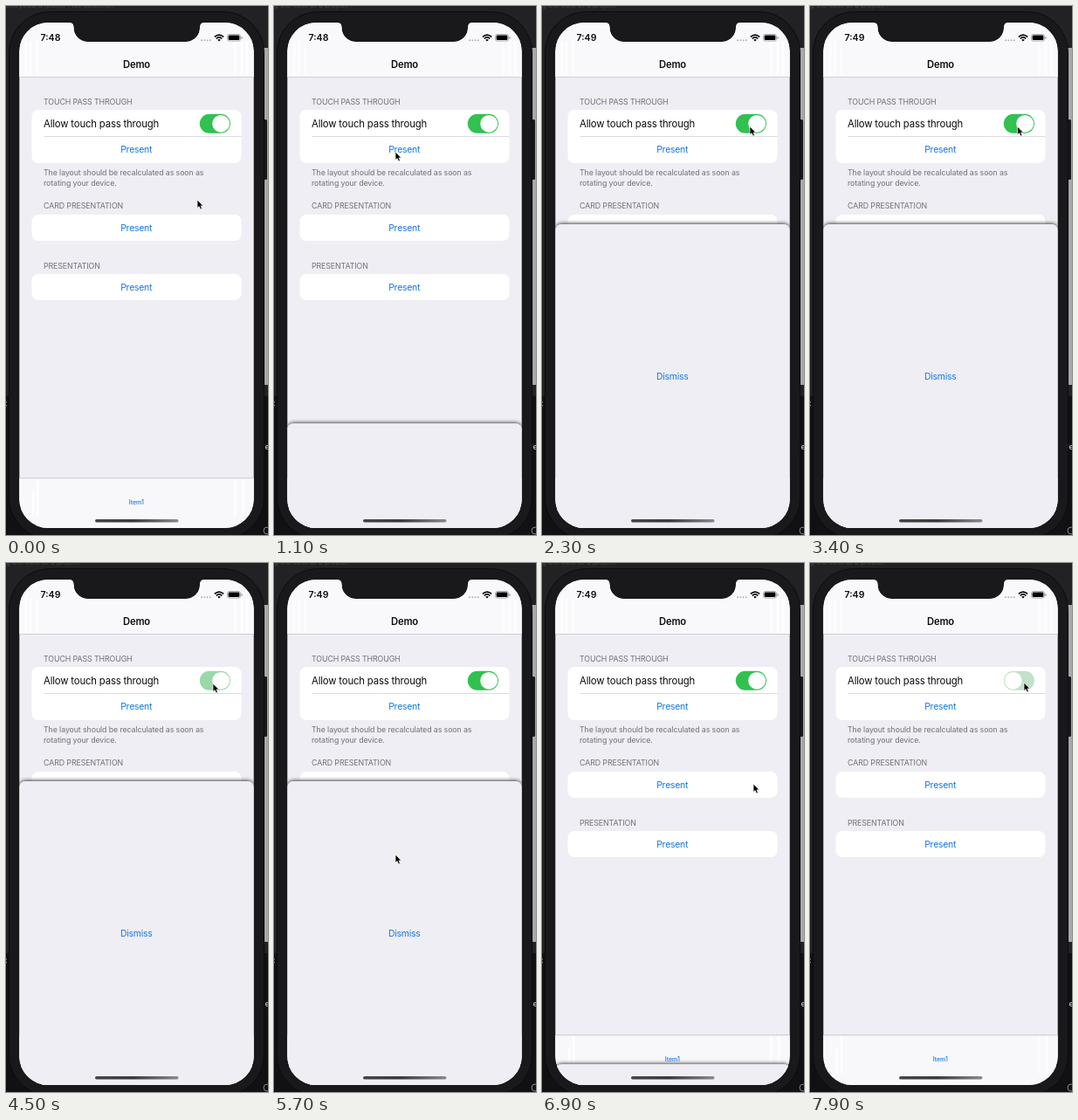
An HTML page for the animation above (8 s loop, 300 by 606 pixels).

```html
<!DOCTYPE html>
<html lang="en">
<head>
<meta charset="utf-8">
<title>Sheet demo</title>
<style>
  html, body { margin: 0; width: 100%; height: 100%; overflow: hidden; background: #0b0a0c; }
  svg { display: block; width: 300px; height: 606px; }
  text { font-family: Inter, Roboto, sans-serif; fill: #0c0c0d; }
  .mid { text-anchor: middle; }
  .row { font-size: 11.3px; letter-spacing: -.15px; }
  .note { font-size: 8.8px; letter-spacing: -.09px; fill: #707075; }
  .link { font-size: 10.4px; letter-spacing: -.22px; fill: #1476e8; text-anchor: middle; }
  .title { font-size: 11.2px; font-weight: 600; letter-spacing: -.2px; }
  .clock { font-size: 10.6px; font-weight: 600; }
  .tab { font-size: 7px; font-weight: 500; fill: #1476e8; }
  .dim { font-size: 8px; fill: #434246; }
</style>
</head>
<body>
<svg viewBox="0 0 300 606">
  <defs>
    <clipPath id="screen">
      <path d="M15.3 52A33 33 0 0 1 48.3 19H72.5Q77.5 19 77.5 25A16 16 0 0 0 93.5 41H206A16 16 0 0 0 222 25Q222 19 227 19H250.7A33 33 0 0 1 283.7 52V565A33 33 0 0 1 250.7 598H48.3A33 33 0 0 1 15.3 565Z"/>
    </clipPath>
    <filter id="shade" x="-10%" y="-10%" width="120%" height="120%">
      <feDropShadow dx="0" dy="-.8" stdDeviation="2" flood-color="#000" flood-opacity=".8"/>
    </filter>
    <linearGradient id="bar">
      <stop offset="0" stop-color="#454448"/>
      <stop offset=".45" stop-color="#3a393d"/>
      <stop offset="1" stop-color="#8a898d"/>
    </linearGradient>
  </defs>

  <!-- desktop behind the phone -->
  <rect width="300" height="606" fill="#111012"/>
  <rect width="300" height="447" fill="#222124"/>
  <text id="crumb" class="dim" y="2"></text>
  <rect x="290" y="48" width="20" height="386" rx="5" fill="#a9a8ac"/>
  <text x="-1" y="458" font-size="9" style="fill:#ccc">:</text>
  <text x="294" y="508" font-size="9" style="fill:#ddd">.e</text>
  <circle cx="299" cy="601" r="4" fill="none" stroke="#88878a"/>

  <!-- phone -->
  <rect x="294" y="130" width="5" height="69" rx="1.5" fill="#19181b"/>
  <rect x="3.5" y="6.5" width="292" height="604" rx="47" fill="#19181b" stroke="#0c0b0d"/>
  <g clip-path="url(#screen)">
    <rect x="15" y="19" width="269" height="579" fill="#efeef4"/>
    <rect x="15" y="19" width="269" height="62" fill="#f9f9fc"/>
    <path d="M15 81.5H284" stroke="#c9c8cd" stroke-width=".8"/>
    <path d="M23 41V80M28 41V80M36 41V80M262 41V80M270 41V80M276 41V80" stroke="#fff" stroke-width="3" opacity=".7"/>

    <text id="clock" class="clock" x="39.5" y="40.3"></text>
    <g fill="#b4b4b8">
      <circle cx="224" cy="39.2" r="1"/><circle cx="227.3" cy="39.2" r="1"/>
      <circle cx="230.6" cy="39.2" r="1"/><circle cx="233.9" cy="39.2" r="1"/>
    </g>
    <path d="M238.8 35.4Q244 30.8 249.2 35.4M240.7 37.4Q244 34.5 247.3 37.4" fill="none" stroke="#000" stroke-width="1.6"/>
    <path d="M242.2 38.7Q244 37.3 245.8 38.7L244 40.6Z"/>
    <rect x="253.5" y="32.5" width="15" height="7.6" rx="2.2" fill="none" stroke="#8c8c8f" stroke-width=".7"/>
    <rect x="254.6" y="33.6" width="12.8" height="5.4" rx="1.3"/>
    <path d="M269.5 35V37.8Q270.8 37.5 270.8 36.4T269.5 35Z" fill="#8c8c8f"/>
    <text class="title mid" x="149.5" y="71">Demo</text>

    <g fill="#fff">
      <rect x="29.5" y="119" width="240" height="61" rx="7.5"/>
      <rect x="29.5" y="239" width="240" height="30" rx="7.5"/>
      <rect x="29.5" y="307" width="240" height="30" rx="7.5"/>
    </g>
    <path d="M43.5 149.5H269.5" stroke="#d3d2d7" stroke-width=".8"/>
    <text class="note" x="43" y="112.7">TOUCH PASS THROUGH</text>
    <text class="row" x="43" y="138.9">Allow touch pass through</text>
    <text id="present" class="link" x="149.2" y="168.4">Present</text>
    <text class="note" x="43" y="193.6">The layout should be recalculated as soon as</text>
    <text class="note" x="43" y="206">rotating your device.</text>
    <text class="note" x="43" y="232.4">CARD PRESENTATION</text>
    <text class="link" x="149.2" y="258">Present</text>
    <text class="note" x="43" y="300.7">PRESENTATION</text>
    <text class="link" x="149.2" y="326.2">Present</text>

    <rect id="track" x="221.8" y="123.8" width="35.2" height="22" rx="11"/>
    <circle id="thumb" cy="134.8" r="9.9" fill="#fff"/>

    <rect x="15" y="541" width="269" height="58" fill="#f8f8fb"/>
    <path d="M15 540.8H284" stroke="#c4c3c8" stroke-width=".8"/>
    <path d="M36 542V585M31 555V585M262 542V585M271 542V585" stroke="#fff" stroke-width="3" opacity=".7"/>
    <text class="tab mid" x="149.3" y="571">Item1</text>

    <g id="sheet">
      <rect x="15.3" width="268.4" height="380" rx="7" fill="#efeef4" filter="url(#shade)"/>
      <text id="dismiss" class="link" x="149.2" y="177.8">Dismiss</text>
    </g>
    <rect x="102" y="588" width="95.5" height="3.6" rx="1.8" fill="url(#bar)"/>
  </g>

  <path id="cursor" d="M0 0V9.4L2.1 7.6L3.7 11L5.4 10.2L4 6.9H6.8Z" fill="#000" stroke="#fff" stroke-width=".7" stroke-linejoin="round"/>
</svg>

<script>
const LOOP = 8000, STEP = 100;
const OPEN_Y = 250, CLOSED_Y = 607;
const OFF = [233, 233, 235], ON = [49, 193, 81];

// time, x, y of the pointer tip
const PATH = [
  [0, 219, 222], [250, 190, 165], [400, 154, 138], [600, 139, 167],
  [1300, 139, 167], [1600, 165, 411], [1800, 165, 411], [2100, 222, 205], [2300, 238, 138],
  [4400, 237, 138], [4600, 237, 138], [4900, 162, 164], [5200, 246, 142],
  [5700, 139, 334], [6000, 127, 432], [6500, 127, 432],
  [6900, 242, 253], [7100, 244, 157], [7400, 245, 137]
];
// time, new state of the switch
const FLIPS = [[2450, 0], [3050, 1], [3500, 0], [4350, 1], [7750, 0]];

const $ = id => document.getElementById(id);
const clamp = v => Math.min(1, Math.max(0, v));
const mix = (a, b, k) => a + (b - a) * k;
const within = (t, from, to) => t >= from && t < to;

function pointerAt(t) {
  const next = PATH.findIndex(p => p[0] > t);
  if (next < 0) return PATH[PATH.length - 1].slice(1);
  const a = PATH[next - 1], b = PATH[next];
  const k = (t - a[0]) / (b[0] - a[0]);
  return [mix(a[1], b[1], k), mix(a[2], b[2], k)];
}

// critically damped spring, rate per second
function spring(ms, rate) {
  const x = Math.max(0, ms) / 1000 * rate;
  const v = 1 - (1 + x) * Math.exp(-x);
  return v > .99 ? 1 : v;
}

function sheetY(t) {
  return t < 6300
    ? mix(CLOSED_Y, OPEN_Y, spring(t - 985, 11))
    : mix(OPEN_Y, CLOSED_Y, spring(t - 6400, 8));
}

function switchAt(t) {
  const flip = FLIPS.filter(f => f[0] <= t).pop();
  if (!flip) return { pos: 1, tint: 1 };
  const [start, on] = flip;
  const slide = 1 - (1 - clamp((t - start) / 140)) ** 2;
  const fade = clamp((t - start) / (on ? 345 : 190));
  return { pos: on ? slide : 1 - slide, tint: on ? fade : 1 - fade };
}

function draw(t) {
  const [x, y] = pointerAt(t);
  $("cursor").setAttribute("transform", `translate(${x} ${y})`);

  const top = sheetY(t);
  $("sheet").setAttribute("transform", `translate(0 ${top})`);
  $("sheet").style.display = top > 605 ? "none" : "";

  const { pos, tint } = switchAt(t);
  $("thumb").setAttribute("cx", mix(232.7, 246.1, pos));
  $("track").setAttribute("fill", `rgb(${OFF.map((c, i) => Math.round(mix(c, ON[i], tint)))})`);

  $("present").style.opacity = within(t, 800, 1000) ? .3 : 1;
  $("dismiss").style.opacity = within(t, 6300, 6500) ? .3 : 1;
  $("clock").textContent = t < 1900 ? "7:48" : "7:49";
  $("crumb").textContent = t < 800 ? "storyboard (Base) › No Selection" : "g the view of a project";
}

const began = performance.now();
function tick() {
  const t = (performance.now() - began) % LOOP;
  draw(Math.floor(t / STEP) * STEP);
  requestAnimationFrame(tick);
}
tick();
</script>
</body>
</html>
```
